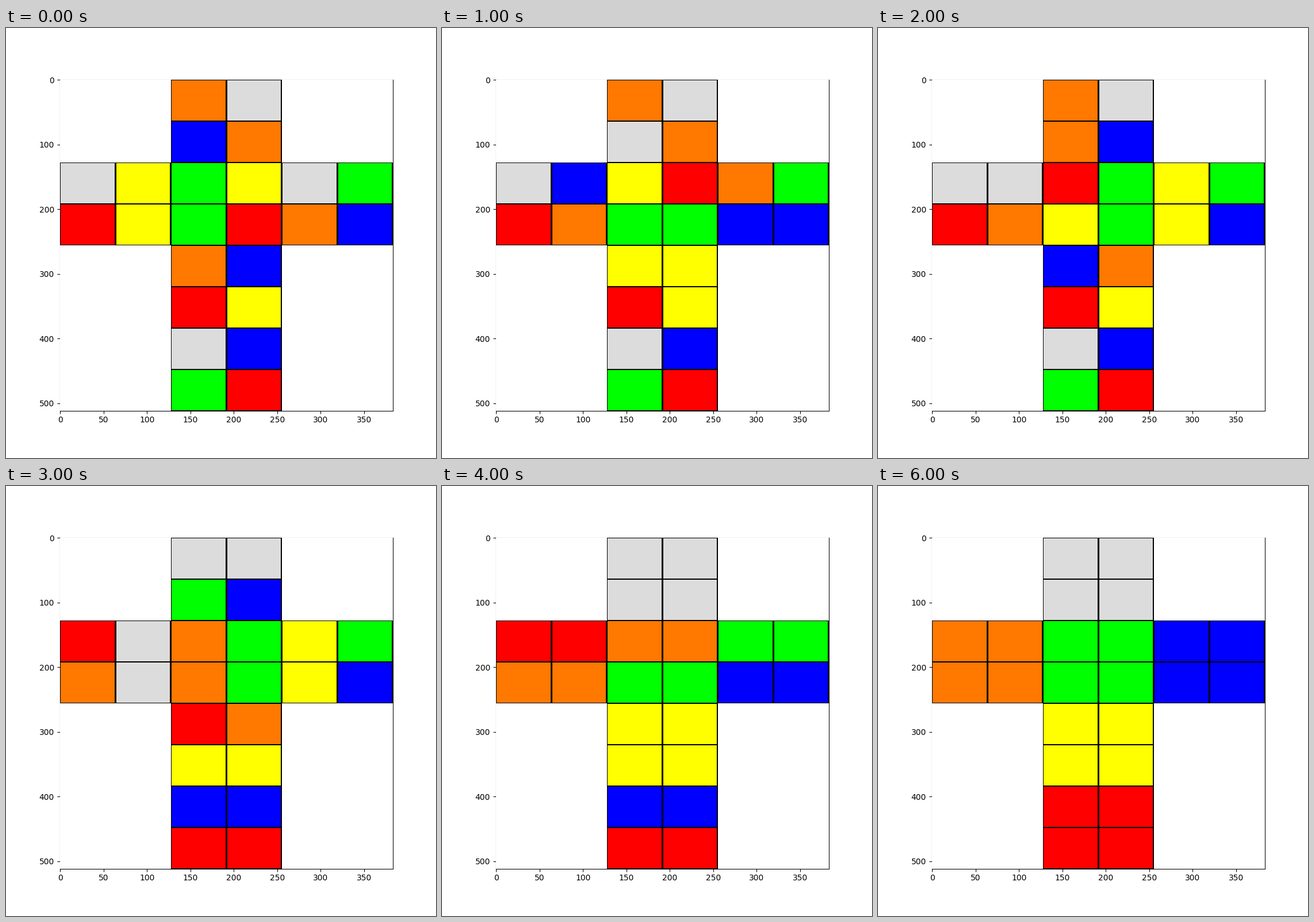
Animation, 748 px wide and 748 px high, one loop 7 s. Source, as a matplotlib script:

```python
import numpy as np
import matplotlib.pyplot as plt
from matplotlib.animation import FuncAnimation

TILE = 64
ROWS, COLS = 8, 6
WIDTH, HEIGHT = 579, 576  # size of the net on screen

COLOURS = {
    "W": (220, 220, 220),
    "O": (255, 120, 0),
    "G": (0, 255, 0),
    "R": (255, 0, 0),
    "B": (0, 0, 255),
    "Y": (255, 255, 0),
}

# Unfolded 2x2 cube after each turn, row by row; short rows are centred
NETS = [
    "OW BO WYGYWG RYGROB OB RY WB GR",
    "OW WO WBYROG ROGGBB YY RY WB GR",
    "OW OB WWRGYG ROYGYB BO RY WB GR",
    "WW GB RWOGYG OWOGYB RO YY BB RR",
    "WW WW RROOGG OOGGBB YY YY BB RR",
    "WW WW OOGGBB OOGGBB YY YY RR RR",
]
ORDER = [0, 1, 2, 3, 4, 4, 5]  # net shown in each second


def draw_net(net):
    img = np.full((ROWS * TILE, COLS * TILE, 3), 255, np.uint8)
    for r, row in enumerate(net.split()):
        first = (COLS - len(row)) // 2
        for c, key in enumerate(row, first):
            tile = img[r * TILE:(r + 1) * TILE, c * TILE:(c + 1) * TILE]
            tile[:] = 0
            tile[1:-1, 1:-1] = COLOURS[key]
    return img


def to_screen(img):
    """Nearest-neighbour scaling to screen pixels."""
    h, w = img.shape[:2]
    y = ((np.arange(HEIGHT) + 0.5) * h / HEIGHT).astype(int)
    x = ((np.arange(WIDTH) + 0.6) * w / WIDTH).astype(int)
    return img[y][:, np.minimum(x, w - 1)]


pictures = [to_screen(draw_net(net)) for net in NETS]

plt.rcParams["font.family"] = "DejaVu Sans"
fig, ax = plt.subplots(figsize=(7.48, 7.48), dpi=100)
ax.patch.set_visible(False)
ax.set_xlim(-0.5, COLS * TILE - 0.5)
ax.set_ylim(ROWS * TILE - 0.5, -0.5)
ax.set_xticks(range(0, 400, 50)[:8])
ax.set_yticks(range(0, 501, 100))

picture = fig.figimage(pictures[0], 94, 82, origin="upper")


def update(i):
    picture.set_data(pictures[ORDER[i]])
    return [picture]


anim = FuncAnimation(fig, update, frames=len(ORDER), interval=1000,
                     repeat=True, repeat_delay=0, blit=False)
plt.show()
```
